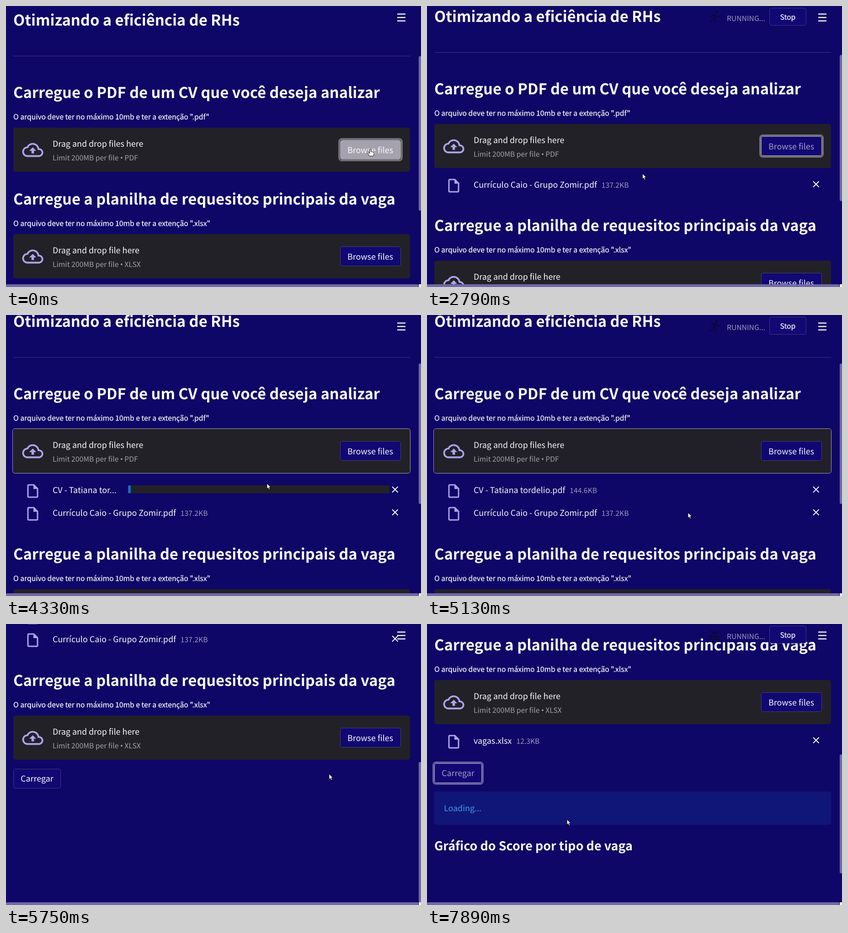
Write an HTML page that moves like this. It is 908 px wide and 617 px high and loops after 7990 ms.

```html
<!DOCTYPE html>
<html lang="pt-BR">
<head>
<meta charset="utf-8">
<title>Upload</title>
<style>
html, body { margin: 0; width: 100%; height: 100%; overflow: hidden; background: #0f0767; }
svg { display: block; width: 908px; height: 617px; }
text { font-family: "Noto Sans CJK JP", "Noto Sans CJK SC", "Noto Sans", sans-serif; font-size: 17.9px; fill: #fafafa; white-space: pre; text-rendering: geometricPrecision; }
.h { font-size: 32.72px; font-weight: 700; }
.h4 { font-size: 26.9px; font-weight: 700; }
.s { font-size: 15.7px; }
.firm { stroke: #fafafa; stroke-width: .25; }
.dim { fill: #fafafa; fill-opacity: .6; }
.dot { font-family: "Noto Sans", sans-serif; }
.icon { fill: #ada5ec; }
.box { fill: #222127; }
.face { fill: #110873; stroke: #fafafa; stroke-opacity: .2; }
.ring { fill: none; stroke: #fafafa; stroke-opacity: .36; stroke-width: 4; visibility: hidden; }
.hover .face { stroke-opacity: .62; }
.hover text { fill-opacity: .62; }
.ringed .ring { visibility: inherit; }
.press .face { fill: #a5a2ae; stroke: #a5a2ae; }
.press text { fill-opacity: 1; }
</style>
</head>
<body>
<svg id="stage" viewBox="0 0 908 617"></svg>
<script>
const LOOP = 7990;
const TICK = 101.8;
const NS = "http://www.w3.org/2000/svg";
const BG = "#0f0767";
const stage = document.getElementById("stage");

function el(parent, tag, attrs = {}, content) {
  const node = document.createElementNS(NS, tag);
  for (const key in attrs) node.setAttribute(key, attrs[key]);
  if (content !== undefined) node.textContent = content;
  parent.append(node);
  return node;
}
const group = (parent, cls = "") => el(parent, "g", { class: cls });
const label = (parent, x, y, content, cls = "") => el(parent, "text", { x, y, class: cls }, content);
const rect = (parent, x, y, width, height, more) => el(parent, "rect", { x, y, width, height, ...more });
const path = (parent, d, more) => el(parent, "path", { d, ...more });
const show = (node, on) => { node.style.display = on ? "" : "none"; };
const move = (node, x, y) => node.setAttribute("transform", `translate(${x} ${y})`);

const CLOUD = "M19.35 10.04C18.67 6.59 15.64 4 12 4 9.11 4 6.6 5.64 5.35 8.04 2.34 8.36 0 10.91 0 14c0 3.31 2.69 6 6 6h13c2.76 0 5-2.24 5-5 0-2.64-2.05-4.78-4.65-4.96zM19 18H6c-2.21 0-4-1.79-4-4 0-2.05 1.53-3.76 3.56-3.97l1.07-.11.5-.95C8.08 7.14 9.94 6 12 6c2.62 0 4.88 1.86 5.39 4.43l.3 1.5 1.53.11c1.56.1 2.78 1.41 2.78 2.96 0 1.65-1.35 3-3 3zM8 13h2.55v3h2.9v-3H16l-4-4z";
const SHEET = "M14 2H6c-1.1 0-2 .9-2 2v16c0 1.1.9 2 2 2h12c1.1 0 2-.9 2-2V8zM6 20V4h7v5h5v11z";

function button(parent, x, y, w, h, content, tx, ty) {
  const g = group(parent);
  rect(g, x - 2, y - 2, w + 4, h + 4, { rx: 6, class: "ring" });
  rect(g, x + .5, y + .5, w - 1, h - 1, { rx: 4.5, class: "face" });
  label(g, tx, ty, content);
  return g;
}
function setButton(b, hover, ringed, press) {
  b.classList.toggle("hover", hover);
  b.classList.toggle("ringed", ringed);
  b.classList.toggle("press", !!press);
}

// Heading, hint and drop zone; y is the top of the zone
function uploader(parent, y, title, hint, prompt, type) {
  label(parent, 16, y - 65, title, "h");
  label(parent, 16, y - 18, hint, "s firm");
  rect(parent, 16, y, 868, 97, { rx: 5, class: "box" });
  path(parent, CLOUD, { class: "icon", transform: `translate(35.5 ${y + 26}) scale(1.92)` });
  label(parent, 102, y + 42, prompt);
  const limit = label(parent, 102, y + 71.5, "Limit 200MB per file ", "s dim");
  el(limit, "tspan", { class: "dot" }, "•");
  el(limit, "tspan", {}, " " + type);
  return button(parent, 731, y + 27, 133, 43, "Browse files", 747, y + 55.5);
}

// One file row centred on y = 0
function fileRow(parent, name, size, short, barX) {
  const g = group(parent);
  path(g, SHEET, { class: "icon", transform: "translate(40.5 -16.5) scale(1.5)" });
  const done = label(g, 102, 6, name);
  el(done, "tspan", { class: "s dim", dx: 10 }, size);
  const busy = group(g);
  label(busy, 102, 6, short);
  rect(busy, barX, -11, 839 - barX, 17.5, { rx: 2, class: "box" });
  const bar = rect(busy, barX, -11, 6, 17.5, { rx: 2, fill: "#1467c8" });
  path(g, "M845 -8l12.5 12.5m0-12.5L845 4.5", { stroke: "#fafafa", "stroke-width": 2, fill: "none" });
  return {
    set(t, start, end, y) {
      show(g, t >= start);
      show(done, t >= end);
      show(busy, t < end);
      const part = Math.min(1, Math.max(0, t - start) / (end - start));
      bar.setAttribute("width", Math.max(6, part * part * (839 - barX)));
      move(g, 0, y);
    }
  };
}

rect(stage, 0, 0, 908, 617, { fill: BG });
const page = group(stage);

const first = group(page);
label(first, 16, 43, "Otimizando a eficiência de RHs", "h");
rect(first, 16, 109.5, 868, 1, { fill: "#fafafa", "fill-opacity": .2 });
const browse1 = uploader(first, 267, "Carregue o PDF de um CV que você deseja analizar",
  'O arquivo deve ter no máximo 10mb e ter a extenção ".pdf"', "Drag and drop files here", "PDF");
const outline = rect(first, 14.5, 266.5, 870, 98, { rx: 5, fill: "none", stroke: "#a9a7b4" });

const second = group(page);
const browse2 = uploader(second, 501, "Carregue a planilha de requesitos principais da vaga",
  'O arquivo deve ter no máximo 10mb e ter a extenção ".xlsx"', "Drag and drop file here", "XLSX");

const resume = fileRow(page, "Currículo Caio - Grupo Zomir.pdf", "137.2KB", "Currículo Caio...", 267);
const cv = fileRow(page, "CV - Tatiana tordelio.pdf", "144.6KB", "CV - Tatiana tor...", 267);
const jobs = fileRow(page, "vagas.xlsx", "12.3KB", "vagas....", 186);

const third = group(page);
const send = button(third, 16, 618, 104, 43, "Carregar", 32, 646);
const result = group(third);
rect(result, 16, 680, 868, 73, { rx: 5, fill: "#101678" });
label(result, 37, 723, "Loading...").style.fill = "#3a9bf2";
label(result, 16, 809, "Gráfico do Score por tipo de vaga", "h4");

// Status widget
const status = group(stage);
rect(status, 604, 8, 148, 32, { rx: 4, fill: BG });
const poses = [
  "M632 19l-5 8 5 4-2 7M627 27l-3 6-6 1M631 19l-6 1-3 4M631 20l4 5 5-2",
  "M617 28q3-3 6 0t6 0 6 0 6 0M617 34q3-3 6 0t6 0 6 0 6 0M620 15l8 3-6 7m6-7l7 7",
  "M618 18h22M620 14v8M638 14v8M623 18l3 6h6l3-6M629 24v6l-5 7M629 30l5 7"
].map((d, i) => {
  const g = group(status);
  path(g, d, { fill: "none", stroke: "#0a0740", "stroke-width": 2.6, "stroke-linecap": "round" });
  el(g, "circle", { cx: [634, 636, 629][i], cy: [13, 18, 13][i], r: 2.8, fill: "#0a0740" });
  return g;
});
label(status, 656, 32.5, "RUNNING...", "s dim");
rect(status, 749.5, 4.5, 80, 38, { rx: 4.5, class: "face" });
label(status, 772.5, 29.5, "Stop", "s firm");

for (const y of [16.5, 24, 31.5]) rect(stage, 856, y, 18, 2.4, { fill: "#fafafa" });

// Scroll bars
rect(stage, 0, 611, 908, 6, { fill: BG });
rect(stage, 0, 611, 902, 8, { rx: 2, fill: "#706aa5" });
rect(stage, 903, 611, 5, 6, { fill: "#f4f4f8" });
const thumb = rect(stage, 903, 0, 7, 300, { rx: 2.5, fill: "#706aa5" });

// Pointers
const ink = { fill: "#fff", stroke: "#000", "stroke-width": .9, "stroke-linejoin": "round" };
const arrow = path(stage, "M0 0V11.8L2.7 9.3 4.7 13.6 6.6 12.7 4.7 8.5H8.4Z", ink);
const hand = path(stage, "M-1.5 1Q0-.8 1.3 1V6Q3 5 4 6.5 5.8 6 6.3 7.3 8 7 8 8.5V11.5L6.5 15.5H-1.5L-5.5 9.8Q-5 8-3.8 8.2L-1.5 10Z", ink);

// Moments when a file row, or the result, enters the page
const ADD_RESUME = 2390, ADD_CV = 4320, ADD_JOBS = 6560, LOAD = 7490;

// Tables of time and values, straight between rows
const scrollKeys = [
  [0, 0], [ADD_RESUME - 1, 0], [ADD_RESUME, 8], [ADD_CV - 1, 8], [ADD_CV, 17],
  [5140, 17], [5343, 281], [5550, 418], [ADD_JOBS - 1, 418], [ADD_JOBS, 400], [LOAD - 1, 400], [LOAD, 496]
];
const pointerKeys = [
  [0, 797, 314], [280, 797, 314], [290, 600, 284], [860, 600, 284], [990, 490, 480], [1200, 490, 480],
  [1500, 449, 440], [1990, 469, 368], [2790, 469, 368], [3690, 729, 374], [3890, 729, 374], [4290, 571, 370],
  [4590, 571, 370], [5090, 571, 434], [5390, 571, 434], [5990, 797, 260], [6190, 797, 260], [6390, 528, 287],
  [6690, 528, 287], [7090, 78, 425], [7290, 78, 425], [7690, 330, 427], [7890, 306, 429]
];
const runs = [[2610, 3790], [4560, 5690], [6790, 7090], [7390, 7990]];

function at(keys, t) {
  const i = keys.findIndex(k => k[0] > t);
  if (i < 0) return keys[keys.length - 1].slice(1);
  const a = keys[i - 1], b = keys[i];
  const p = (t - a[0]) / (b[0] - a[0]);
  return a.slice(1).map((v, n) => v + (b[n + 1] - v) * p);
}

function draw(time) {
  // The picture changes about ten times a second
  const t = Math.max(0, Math.floor((time - 30) / TICK) * TICK + 50);
  const within = (a, b) => t >= a && t < b;
  const scroll = Math.round(at(scrollKeys, t)[0]);
  const files = (t >= ADD_RESUME) + (t >= ADD_CV);
  const shift = [0, 66, 118][files];
  const hasJobs = t >= ADD_JOBS, loading = t >= LOAD;
  const below = shift + (hasJobs ? 66 : 0);

  move(first, 0, -scroll);
  move(second, 0, shift - scroll);
  move(third, 0, below - scroll);
  resume.set(t, ADD_RESUME, 2590, (files > 1 ? 452 : 401) - scroll);
  cv.set(t, ADD_CV, 4520, 402 - scroll);
  jobs.set(t, ADD_JOBS, 6760, 753 - scroll);
  show(outline, within(ADD_CV, 5590));
  show(result, loading);

  setButton(browse1, t < 3890, t < 1590 || within(2290, 3890), time < 100);
  setButton(browse2, within(5990, 6890), within(6190, 6890));
  setButton(send, t >= 7090, t >= 7190);

  const run = runs.find(r => within(r[0], r[1]));
  const fade = run ? Math.min(1, Math.max(0, (t - run[0] - 500) / 1000)) : 0;
  page.setAttribute("opacity", 1 - .67 * Math.pow(fade, 1.6));
  show(status, run);
  poses.forEach((g, i) => show(g, Math.floor(time / 400) % 3 === i));

  // The track starts 18px above the stage and is 629px long
  const ratio = 629 / (1167 + below + (loading ? 165 : 0));
  thumb.setAttribute("height", 629 * ratio);
  thumb.setAttribute("y", (238 + scroll) * ratio - 18);

  const [x, y] = at(pointerKeys, t);
  const pointing = t < 290 || within(5990, 6190) || within(7090, 7290);
  show(arrow, !pointing);
  show(hand, pointing);
  move(pointing ? hand : arrow, x, y);
}

const begin = performance.now();
function tick() {
  draw((performance.now() - begin) % LOOP);
  requestAnimationFrame(tick);
}
tick();
</script>
</body>
</html>
```
